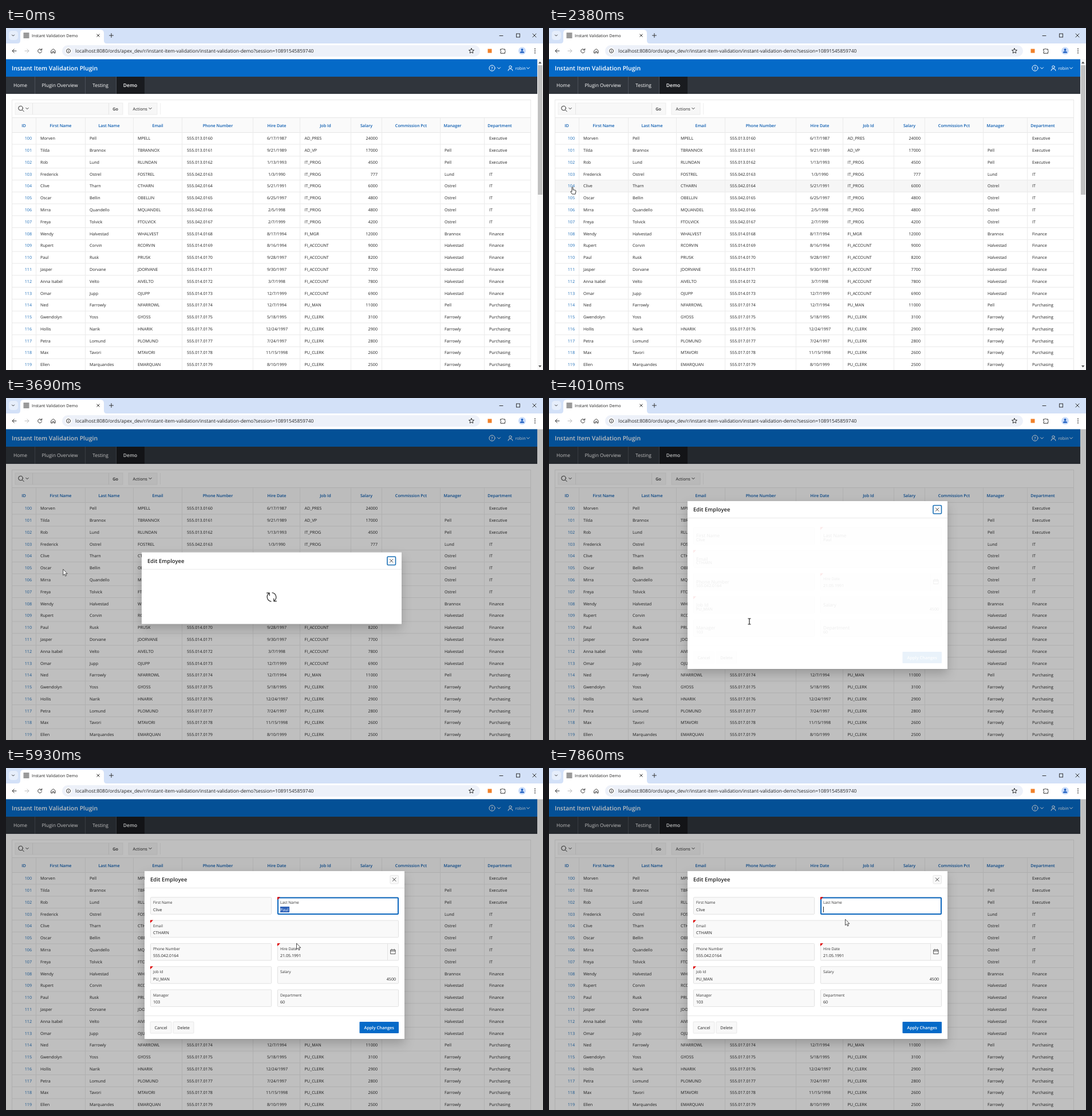
Animation, 938 px wide and 597 px high, one loop 8000 ms. Source, as an HTML page:

```html
<!DOCTYPE html>
<html lang="en">
<head>
<meta charset="utf-8">
<title>Instant Validation Demo</title>
<style>
  html, body { margin: 0; width: 100%; height: 100%; overflow: hidden; background: #fff; }
  svg { display: block; width: 100%; height: 100%; }
  text { font-family: "Open Sans", "Noto Sans", sans-serif; font-size: 7.2px; fill: #222; text-rendering: geometricPrecision; white-space: pre; }
  .b { font-weight: 600; }
  .w { fill: #fff; }
  .mid { text-anchor: middle; }
  .end { text-anchor: end; }
  .link { fill: #1b6cb8; }
  .nav { font-size: 8.45px; }
  .lab { font-size: 6.6px; fill: #333; }
  .val { font-size: 7.1px; }
  .ln { fill: none; stroke: #333; stroke-linecap: round; stroke-linejoin: round; }
  .lw { fill: none; stroke: #fff; stroke-linecap: round; stroke-linejoin: round; }
  #sheet { filter: drop-shadow(0 8px 9px rgba(0,0,0,.2)); }
</style>
</head>
<body>
<svg viewBox="0 0 938 597">
  <rect width="938" height="597" fill="#fff"/>
  <g id="browser"></g>
  <g id="page"></g>
  <g id="scrollbar"></g>
  <rect id="overlay" y="54.5" width="938" height="543" fill-opacity=".25"/>
  <g id="dialog"></g>
  <g id="arrow"><path d="M0 0V10.6L2.4 8.4L4 12L5.7 11.2L4.2 7.8H7.4Z" fill="#fff" stroke="#222" stroke-width=".8"/></g>
  <g id="hand"><path d="M-1 1Q0-.6 1 1V5L5 5.7Q6 6 6 7.5L5 12.5H-.5L-3.3 8.3Q-3.3 6.8-1 8Z" fill="#fff" stroke="#222" stroke-width=".9"/></g>
  <g id="ibeam"><path d="M-2.6-5H-.6L0-4.5L.6-5H2.6M0-4.5V4.5M-2.6 5H-.6L0 4.5L.6 5H2.6" fill="none" stroke="#222" stroke-width="1.2"/></g>
</svg>
<script>
const $ = id => document.getElementById(id);
const text = (x, y, s, cls = '', more = '') => `<text x="${x}" y="${y}" class="${cls}" ${more}>${s}</text>`;
const rect = (x, y, w, h, fill, more = '') => `<rect x="${x}" y="${y}" width="${w}" height="${h}" fill="${fill}" ${more}/>`;
const path = (d, cls = 'ln', more = '') => `<path d="${d}" class="${cls}" ${more}/>`;
const circle = (x, y, r, more) => `<circle cx="${x}" cy="${y}" r="${r}" ${more}/>`;
const chevron = (x, y, cls, r = 2.5) => path(`M${x - r} ${y - r / 2}l${r} ${r}l${r} ${-r}`, cls);
const cross = (x, y, r, more) => path(`M${x - r} ${y - r}l${2 * r} ${2 * r}m0 ${-2 * r}l${-2 * r} ${2 * r}`, 'ln', more);

// Browser frame
$('browser').innerHTML =
  rect(0, 0, 938, 27, '#d3e1f8') +
  rect(5, 5, 16, 16, '#e6eefb', 'rx="5"') + chevron(12.5, 13, 'ln', 2) +
  path('M20 27Q25 27 25 22V9Q25 3 31 3H165Q171 3 171 9V22Q171 27 176 27Z', '', 'fill="#fff"') +
  rect(30.5, 8, 10, 10, '#9a9a9a') +
  text(45, 15.7, 'Instant Validation Demo') +
  cross(161, 13, 2.2) + path('M180.5 13h7m-3.500-3.500v7') +
  path('M862 13.500h6') + rect(891.5, 10, 6, 6, 'none', 'stroke="#333"') + cross(923, 13, 3) +
  path('M18 40h-7m3.200-3.200l-3.200 3.200l3.200 3.200') +
  path('M33 40h7m-3.200-3.200l3.200 3.200l-3.200 3.200', 'ln', 'style="stroke:#bbb"') +
  path('M62 38.300A3.400 3.400 0 1 0 62.400 41M62.700 36v2.600h-2.600') +
  path('M79 39.500l3.500-3l3.500 3v4.200h-2.300v-2.700h-2.400v2.700H79Z') +
  rect(98, 30, 730, 20, '#edf1f9', 'rx="10"') +
  circle(109, 40, 5.8, 'fill="#fff"') + circle(109, 40, 3.5, 'class="ln"') + path('M109 39.700v2M109 38.200v.100') +
  text(121, 42.8, 'localhost:8080/ords/apex_dev/r/instant-item-validation/instant-validation-demo?session=10891545859740', '', 'style="font-size:8.41px"') +
  path('M813 35.500l1.300 2.900l3.200.300l-2.400 2.100l.700 3.100l-2.800-1.600l-2.800 1.600l.700-3.100l-2.400-2.100l3.200-.300Z') +
  rect(841.5, 36.5, 7, 7, '#f0812b') +
  path('M864 37h2.300q.7-2 2.400 0h2.800v2.500q1.900.7 0 2.400v2.300h-7.500v-2.400q1.800-1 0-2.400Z') +
  circle(901.5, 39.8, 6.5, 'fill="#c9dcfa"') + circle(901.5, 38, 1.9, 'fill="#1f5fc0"') +
  path('M897.800 43.500q0-3 3.700-3t3.700 3Z', '', 'fill="#1f5fc0"') +
  [36.5, 40, 43.5].map(y => circle(924, y, .9, 'fill="#333"')).join('');

// Application page
const rowH = 20.79, top0 = 182.2;
const groups = [[3, 'Executive', '013'], [5, 'IT', '042'], [6, 'Finance', '014'], [6, 'Purchasing', '017']]
  .flatMap(([n, dept, area]) => Array(n).fill([dept, area]));
const people = `Morven,Pell,MPELL,6/17/1987,AD_PRES,24000,
Tilda,Brannox,TBRANNOX,9/21/1989,AD_VP,17000,Pell
Rob,Lund,RLUNDAN,1/13/1993,IT_PROG,4500,Pell
Frederick,Ostrel,FOSTREL,1/3/1990,IT_PROG,777,Lund
Clive,Tharn,CTHARN,5/21/1991,IT_PROG,6000,Ostrel
Oscar,Bellin,OBELLIN,6/25/1997,IT_PROG,4800,Ostrel
Mirra,Quandello,MQUANDEL,2/5/1998,IT_PROG,4800,Ostrel
Freya,Tolvick,FTOLVICK,2/7/1999,IT_PROG,4200,Ostrel
Wendy,Halvestad,WHALVEST,8/17/1994,FI_MGR,12000,Brannox
Rupert,Corvin,RCORVIN,8/16/1994,FI_ACCOUNT,9000,Halvestad
Paul,Rusk,PRUSK,9/28/1997,FI_ACCOUNT,8200,Halvestad
Jasper,Dorvane,JDORVANE,9/30/1997,FI_ACCOUNT,7700,Halvestad
Anna Isabel,Velto,AIVELTO,3/7/1998,FI_ACCOUNT,7800,Halvestad
Omar,Jupp,OJUPP,12/7/1999,FI_ACCOUNT,6900,Halvestad
Ned,Farrowly,NFARROWL,12/7/1994,PU_MAN,11000,Pell
Gwendolyn,Yoss,GYOSS,5/18/1995,PU_CLERK,3100,Farrowly
Hollis,Narik,HNARIK,12/24/1997,PU_CLERK,2900,Farrowly
Petra,Lomund,PLOMUND,7/24/1997,PU_CLERK,2800,Farrowly
Max,Tavori,MTAVORI,11/15/1998,PU_CLERK,2600,Farrowly
Ellen,Marquandes,EMARQUAN,8/10/1999,PU_CLERK,2500,Farrowly`.split('\n').map(line => line.split(','));
const phone = i => `555.${groups[i][1]}.01${60 + i}`;

const tableRow = ([first, last, email, hired, job, salary, boss], i) => {
  const y = +(top0 + rowH * i + 13).toFixed(1);
  return text(45, y, 100 + i, 'end link') + text(60, y, first) + text(146, y, last) + text(230, y, email) +
    text(316, y, phone(i)) + text(473, y, hired, 'mid') + text(521.5, y, job) + text(649, y, salary, 'end') +
    text(766, y, boss) + text(844, y, groups[i][0]) +
    path(`M11 ${(y + 7.8).toFixed(1)}H917`, '', 'stroke="#e9e9e9"');
};
const headers = [['ID', 31], ['First Name', 95.5], ['Last Name', 180], ['Email', 265], ['Phone Number', 370], ['Hire Date', 473],
  ['Job Id', 558], ['Salary', 629.5], ['Commission Pct', 707.5], ['Manager', 780], ['Department', 862.5]];
const columns = [52.5, 138.5, 222.5, 307.5, 431.5, 513.5, 602.5, 656.5, 758.5, 835.5];

$('page').innerHTML =
  rect(0, 54.5, 928, 30.5, '#056ac8') + text(10, 74, 'Instant Item Validation Plugin', 'b w', 'style="font-size:10.5px"') +
  circle(849, 70, 5, 'class="lw"') + text(849, 72.7, '?', 'mid w b') + chevron(861, 70, 'lw') +
  circle(881, 68, 2.2, 'class="lw"') + path('M877 74.500q0-3.500 4-3.500t4 3.500', 'lw') +
  text(889.5, 73, 'robin', 'w', 'style="font-size:7.4px"') + chevron(912, 70, 'lw') +
  rect(0, 85, 928, 30, '#30353c') + rect(192, 85, 50, 30, '#191b1f') +
  path('M50.500 85v30M138.500 85v30M192.500 85v30', '', 'stroke="#4b5058"') +
  text(25, 103.3, 'Home', 'nav w mid') + text(94, 103.3, 'Plugin Overview', 'nav w mid') +
  text(165, 103.3, 'Testing', 'nav w mid') + text(217, 103.3, 'Demo', 'nav w b mid') +
  rect(10.5, 125.500, 906, 480, '#fff', 'stroke="#e8e8e8"') +
  rect(16, 131, 188, 20, '#f8f8f8', 'stroke="#ededed"') + path('M46.500 131v20M179.500 131v20', '', 'stroke="#e6e6e6"') +
  circle(25.5, 140, 3.8, 'class="ln"') + path('M28.300 142.800l3 3') + chevron(37, 140.5, 'ln', 2.2) +
  text(191, 144, 'Go', 'b mid') +
  rect(214, 131, 50, 20, '#f7f7f7', 'stroke="#ebebeb"') + text(221.5, 143.8, 'Actions', '', 'style="font-size:7.4px"') + chevron(252, 140.5, 'ln', 2.2) +
  path('M269.500 131v20', '', 'stroke="#eee"') +
  rect(11, 157, 905, 25, '#fafafa') + path('M11 156.500H917M11 182.500H917', '', 'stroke="#e6e6e6"') +
  headers.map(([s, x]) => text(x, 172.700, s, 'b mid', 'style="fill:#0b5cb0"')).join('') +
  `<rect id="hover" x="11" width="905" height="${rowH}" fill="#f6f6f6"/>` +
  people.map(tableRow).join('') +
  path(columns.map(x => `M${x} 157V597`).join(''), '', 'stroke="#ebebeb"');

$('scrollbar').innerHTML = rect(928, 54.5, 10, 543, '#f8f8f8') + rect(929, 65, 8, 226, '#c1c1c1') +
  path('M930 62l2.700-3.500l2.700 3.500Z', '', 'fill="#555"') + path('M930 589l2.700 3.500l2.700-3.500Z', '', 'fill="#555"');

// Edit dialog, laid out at its full size
const fields = [
  ['First Name', 'Clive', 252, 0], ['Last Name', '', 474, 0, 1], ['Email', 'CTHARN', 252, 1, 1],
  ['Phone Number', phone(4), 252, 2], ['Hire Date', '21.05.1991', 474, 2, 1], ['Job Id', 'PU_MAN', 252, 3, 1],
  ['Salary', '4500', 474, 3], ['Manager', '103', 252, 4], ['Department', '60', 474, 4]];
const field = ([label, value, x, line, required]) => {
  const y = +(225.8 + 40.3 * line).toFixed(1), right = label === 'Salary';
  return rect(x + .5, y, label === 'Email' ? 433 : 211, 29.5, '#f9f9f9', 'stroke="#e2e2e2" rx="1"') +
    (label === 'Last Name' ? `<rect id="focus" x="475" y="226.5" width="210" height="28.500" rx="1" fill="#fff" stroke="#0b66bd" stroke-width="2"/>` : '') +
    (required ? path(`M${x} ${y - .5}h5l-5 5Z`, '', 'fill="#d00"') : '') +
    `<g class="label" data-x="${x + 5}" data-y="${y + 11.5}" data-still="${label === 'Hire Date' ? 1 : ''}">${text(0, 0, label, 'lab')}</g>` +
    text(right ? 681 : x + 5, y + 24, value, right ? 'val end' : 'val');
};
const button = (x, w, label) => rect(x, 443, w, 20, '#f8f8f8', 'stroke="#e8e8e8" rx="1"') + text(x + w / 2, 455.700, label, 'mid');

$('dialog').innerHTML =
  `<rect id="sheet" x="242" y="180" width="454" fill="#fff"/>` +
  text(252, 198.4, 'Edit Employee', 'b', 'style="font-size:9.46px"') + path('M242 209.500h454', '', 'stroke="#e8e8e8"') +
  `<rect id="close" x="671" y="187.500" width="14.500" height="14.500" rx="1.500"/>` + cross(678.2, 194.7, 2.8, 'stroke-width=".9"') +
  `<g id="spinner"><path class="ln" stroke-width="1.300" d="M-7.500-1.500A7.800 7.800 0 0 1 6.500-4.500M7.500-8v4.500H3M7.500 1.500A7.800 7.800 0 0 1-6.500 4.500M-7.500 8v-4.500H-3"/></g>` +
  '<g id="form">' + fields.map(field).join('') +
  `<rect id="selection" y="242" height="10" fill="#2f62b8"/>` + text(479, 249.6, 'Paul', 'val', 'id="typed"') +
  `<path id="caret" d="M479.500 242v10" stroke="#111" stroke-width=".9"/>` +
  path('M666.500 307v28.500', '', 'stroke="#e2e2e2"') + path('M672 317.500h8v7h-8ZM672 319.500h8M674 316v1.500M678 316v1.500', 'ln', 'stroke-width=".8"') +
  path('M242 432.500h454', '', 'stroke="#e8e8e8"') + button(252, 37, 'Cancel') + button(292, 36, 'Delete') +
  rect(617.5, 443, 68.5, 20, '#056ac8', 'rx="1"') + text(651.7, 455.8, 'Apply Changes', 'mid b w', 'style="font-size:7.4px"') + '</g>';
const labels = [...document.querySelectorAll('.label')];

// Pointer path: time, x, y, shape from this time on
const pointerKeys = [
  [900, 448.5, 428, 'arrow'], [2340, 41, 277.5, 'hand'], [3500, 41, 277.5, 'arrow'], [3930, 350, 390, 'ibeam'],
  [4330, 350, 390, 'ibeam'], [4810, 514, 250, 'ibeam'], [5050, 514, 250, 'ibeam'], [5290, 427, 248, 'ibeam'],
  [5530, 427, 248, 'ibeam'], [5770, 507.5, 306, 'arrow'], [6670, 507.5, 306, 'arrow'], [6830, 511, 281, 'arrow'],
  [6990, 507, 259, 'arrow'], [7150, 507, 259, 'arrow'], [7300, 506, 258, 'arrow'], [7540, 506, 258, 'arrow'], [7860, 517.5, 264, 'arrow']];

const clamp = (v, lo = 0, hi = 1) => Math.min(hi, Math.max(lo, v));
const ramp = (t, from, to) => clamp((t - from) / (to - from));
const show = (id, on) => $(id).setAttribute('display', on ? 'inline' : 'none');
const set = (id, attrs) => Object.entries(attrs).forEach(([k, v]) => $(id).setAttribute(k, v));

function pointerAt(time) {
  const t = Math.floor((time - 20) / 80) * 80 + 20;
  const i = pointerKeys.findLastIndex(k => k[0] <= t);
  if (i < 0) return null;
  const [t0, x0, y0, shape] = pointerKeys[i];
  const [t1, x1, y1] = pointerKeys[i + 1] || [t0 + 1, x0, y0];
  const p = ramp(t, t0, t1), e = p * p * (3 - 2 * p);
  return { x: x0 + (x1 - x0) * e, y: y0 + (y1 - y0) * e, shape };
}

function draw(t) {
  const pointer = pointerAt(t), modal = t >= 3450;
  for (const shape of ['arrow', 'hand', 'ibeam']) show(shape, pointer && pointer.shape === shape);
  if (pointer) set(pointer.shape, { transform: `translate(${pointer.x} ${pointer.y})` });

  show('hover', pointer && !modal);
  if (pointer) set('hover', { y: top0 + rowH * Math.max(0, Math.floor((pointer.y - top0) / rowH)) });
  show('scrollbar', !modal);
  show('overlay', modal);
  show('dialog', modal);
  if (!modal) return;

  const loaded = t >= 3850, h = loaded ? 293 : 125;
  const opening = ramp(t, 3450, 3610), scale = .895 + .105 * opening;
  const center = loaded ? '469 326.5' : '464 332';
  set('dialog', { transform: `translate(${center}) scale(${scale}) translate(-469 ${-180 - h / 2})`, opacity: .6 + .4 * opening });
  set('sheet', { height: h });
  show('spinner', t < 3930);
  set('spinner', { transform: `translate(469 ${180 + (h + 31) / 2}) rotate(${(t - 3450) * .36})` });

  const fade = ramp(t, 3990, 4250);
  set('form', { opacity: fade });
  for (const g of labels) {
    const { x, y, still } = g.dataset, away = still ? 0 : 1 - fade;
    g.setAttribute('transform', `translate(${x} ${+y + 6.5 * away}) scale(${1 + .25 * away})`);
  }

  const focused = t >= 5050, cleared = t >= 6830;
  set('close', focused ? { fill: '#f8f8f8', stroke: '#e6e6e6', 'stroke-width': 1 } : { fill: '#fff', stroke: '#1a6fb5', 'stroke-width': 1.6 });
  show('focus', focused);
  const left = t < 5290 ? clamp(pointer.x, 479, 495) : 479;
  show('selection', focused && !cleared);
  set('selection', { x: left, width: 495 - left });
  show('typed', !cleared);
  $('typed').style.fill = focused && left < 485 ? '#fff' : '#222';
  show('caret', cleared && (t < 7260 || t >= 7760));
}

function tick() {
  draw(performance.now() % 8000);
  requestAnimationFrame(tick);
}
tick();
</script>
</body>
</html>
```
